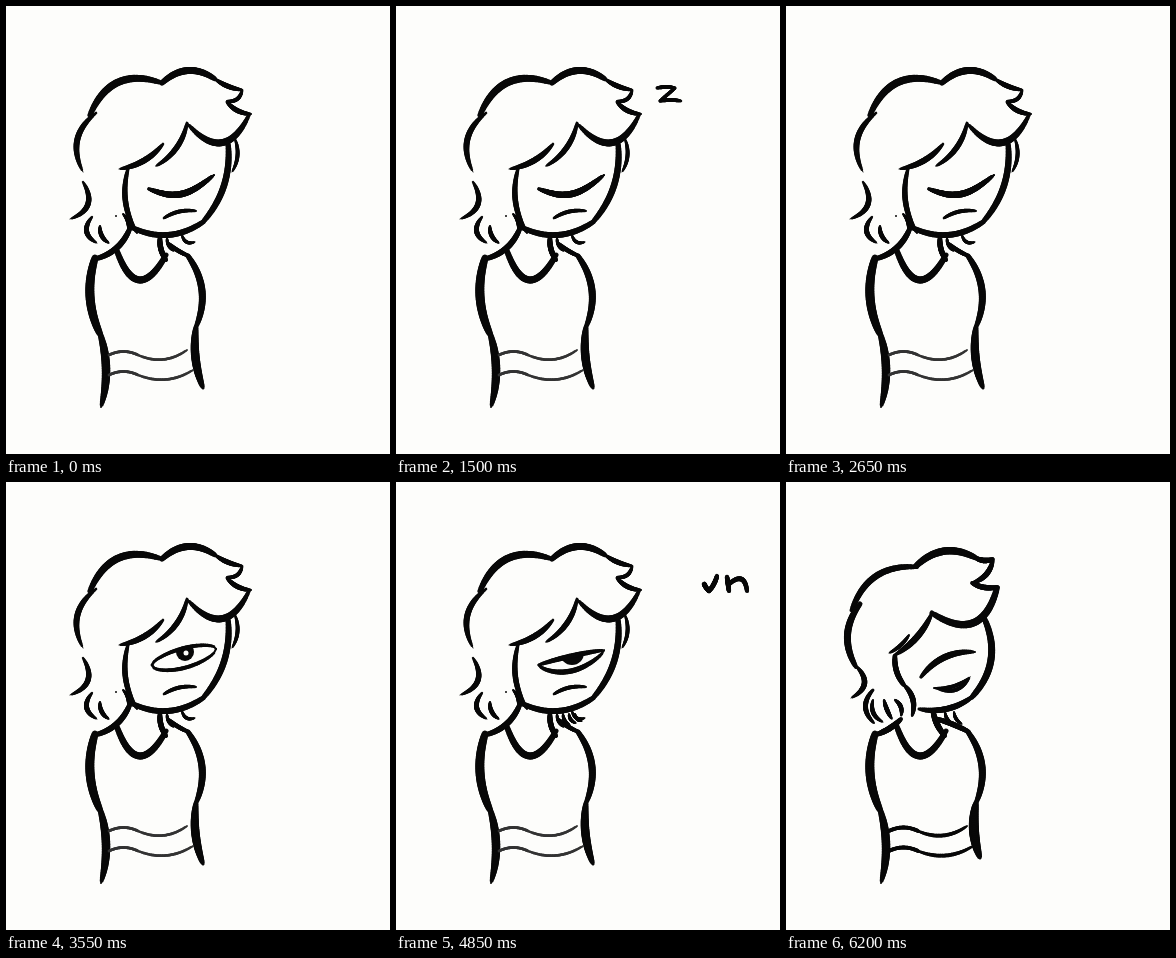
An HTML page with a canvas for the animation above (7.4 s loop, 384 by 448 pixels).

```html
<!DOCTYPE html>
<html lang="en">
<head>
<meta charset="utf-8">
<title>Sleepy cyclops</title>
<style>
html, body { margin: 0; width: 100%; height: 100%; overflow: hidden; background: #fdfdfb; }
canvas { display: block; }
</style>
</head>
<body>
<canvas id="stage" width="384" height="448"></canvas>
<script>
const ctx = document.getElementById('stage').getContext('2d');
const LOOP = 7400, PAPER = '#fdfdfb', INK = '#080808';

const clamp = v => Math.max(0, Math.min(1, v));
const ramp = (t, a, b) => clamp((t - a) / (b - a));
const mix = (a, b, k) => a.map((v, i) => v + (b[i] - v) * k);

// Brush along point(u), u = from..to, swelling from tip to width w
function brush(point, w, tip, from = 0, to = 1) {
  if (to <= from) return;
  const steps = 30;
  let last = point(from);
  for (let i = 1; i <= steps; i++) {
    const u = from + (to - from) * i / steps, next = point(u);
    ctx.lineWidth = tip + (w - tip) * Math.sqrt(Math.max(0, Math.sin(Math.PI * u)));
    ctx.beginPath();
    ctx.moveTo(...last);
    ctx.lineTo(...next);
    ctx.stroke();
    last = next;
  }
}

// Bowed stroke; sag is its depth to the left of the direction of travel
function bow(x1, y1, x2, y2, sag, w = 6, tip = 2, from = 0, to = 1) {
  const dx = x2 - x1, dy = y2 - y1, len = Math.hypot(dx, dy);
  brush(u => {
    const s = 4 * u * (1 - u) * sag / len;
    return [x1 + dx * u + dy * s, y1 + dy * u - dx * s];
  }, w, tip, from, to);
}

function disc(x, y, r) {
  ctx.beginPath();
  ctx.arc(x, y, r, 0, 7);
  ctx.fill();
}

function drawBody(bold) {
  bow(89, 252, 94, 328, -7.5, 9, 6);
  bow(93, 324, 95, 401, 6, 8.5, 2);
  bow(111, 245, 160, 249, -27, 7, 5);
  bow(182, 250, 190, 321, 10, 7, 4);
  bow(190, 321, bold ? 194 : 197, bold ? 376 : 382, -4, bold ? 10 : 8.5, 3);
  ctx.strokeStyle = bold ? INK : '#333';
  for (const y of [349, 369]) {
    const w = bold ? 3.8 : 2.8;
    bow(103, y, 132, y, 3.5, w, w);
    bow(132, y, y > 350 ? 187 : 181, y - 5, -7, w, 2);
  }
  ctx.strokeStyle = INK;
}

function drawHead(bushy) {
  // hair
  bow(84, 109, 156, 77, 18.5, 7.5, 4);
  bow(156, 77, 209, 73, 10.5, 7, 4.5);
  bow(209, 73, 237, 84, -2, 5, 1);
  bow(236, 85, 221, 95, 4, 4);
  bow(221, 96, 245, 108, -3, 5);
  bow(243, 109, 181, 117, 24, 7);
  bow(181, 117, 150, 160, 6, 5.5, 1.5);
  bow(157, 138, 113, 163, 5, 6, 1);
  bow(90, 107, 77, 166, -12.5, 6, 1);
  bow(77, 176, 64, 213, 12, 5.5, 1);
  bow(86, 211, 91, 237, -8, 5, 1);
  bow(94, 220, 103, 237, -3, 4.5, 1);
  bow(117, 208, 122, 223, 2, 3.5, 1);
  disc(110, 210, 1);
  // face
  bow(222, 137, 197, 216, 9, 6.5, 4.5);
  bow(197, 216, 125, 221, 10.5, 6, 4.5);
  bow(229, 133, 226, 166, 4, 4, 1);
  bow(122, 163, 131, 227, -7, 5.5);
  // neck
  bow(124, 222, 89, 253, 6, 6, 4);
  bow(154, 232, 160, 254, -2, 5.5, 4);
  bow(163, 238, 183, 250, -1, 4.5, 3);
  bow(176, 229, 189, 236, -4, 3.5, 1);
  for (let i = 0; i < (bushy ? 4 : 1); i++) bow(161 + 6 * i, 232, 168 + 6 * i, 245 - 2 * i, -2, 3.5, 1);
}

function drawTurnedHead() {
  // hair
  bow(66, 128, 131, 85, 15, 6.5, 4);
  bow(130, 84, 190, 76, 11, 7.5, 5);
  bow(190, 76, 207, 77, -2, 5.5, 3);
  bow(207, 77, 186, 101, 5, 5.5);
  bow(186, 101, 212, 105, -2.5, 5.5, 3);
  bow(211, 106, 146, 131, 24, 7.5, 5);
  bow(146, 131, 107, 174, 5, 6.5, 1);
  bow(123, 153, 103, 171, 2, 4, 1);
  bow(74, 122, 70, 185, -10.5, 7, 4);
  bow(70, 184, 65, 216, 11, 5.5, 1);
  bow(87, 208, 88, 241, -8, 5, 2);
  for (let i = 0; i < 3; i++) bow(87 + 11 * i, 218, 97 + 9 * i, 240 - 3 * i, 4 * i - 5, 4.5, 1);
  // face
  bow(109, 174, 118, 203, -3, 5.5, 4);
  bow(118, 203, 126, 234, 5, 5.5, 2);
  bow(199, 138, 186, 215, 12.5, 7, 5);
  bow(186, 215, 133, 227, 6, 6, 3);
  bow(135, 195, 189, 170, 8, 6.5);
  bow(148, 206, 184, 195, -4, 4, 1);
  bow(152, 207, 184, 195, -7, 4, 1);
  // neck
  bow(115, 237, 89, 253, 2, 6, 3);
  bow(147, 229, 159, 254, -2, 6, 4);
  bow(151, 237, 183, 250, 1, 5.5, 4);
  for (const x of [159, 168]) bow(x, 230, x + 8, 242, -2, 3.5, 1);
}

// Eye pose: left corner, right corner, upper and lower lid depth, roundness, pupil x y r, glint offset, line width
const SHUT = [143, 183, 208, 169, -12, 12, 1, 176, 171, 12, -9, 6.5];
const HALF = [143, 183, 208, 168, 10, 14, .5, 176, 171, 12, -9, 4.5];
const BORED = [146, 183, 210, 167, 9, 11, .5, 179, 170, 9, 1, 4];
const WIDE = [143, 186, 203, 176, 34, 13, .5, 176, 169, 11, -11, 5];
const LOOK = mix(HALF, BORED, .6);

const eyeKeys = [
  [0, SHUT], [1850, SHUT], [2150, HALF], [2300, LOOK], [2500, LOOK], [2650, SHUT],
  [2750, SHUT], [2800, LOOK], [3500, LOOK], [3550, BORED], [3600, BORED], [3900, SHUT],
  [4600, SHUT], [5000, HALF], [5200, HALF], [5500, WIDE], [6050, WIDE], [6150, SHUT], [LOOP, SHUT]
];

function eyeAt(t) {
  const i = eyeKeys.findIndex(k => k[0] > t), [a, p] = eyeKeys[i - 1], [b, q] = eyeKeys[i];
  return mix(p, q, ramp(t, a, b));
}

function drawEye([x1, y1, x2, y2, up, down, round, px, py, r, glint, w]) {
  const lid = depth => u => [
    x1 + (x2 - x1) * u,
    y1 + (y2 - y1) * u + depth * Math.max(0, Math.sin(Math.PI * u)) ** round
  ];
  const upper = lid(-up), lower = lid(down);
  ctx.save();
  ctx.beginPath();
  for (let i = 0; i <= 30; i++) ctx.lineTo(...upper(i / 30));
  for (let i = 30; i >= 0; i--) ctx.lineTo(...lower(i / 30));
  ctx.clip();
  disc(px, py, r);
  ctx.fillStyle = PAPER;
  disc(px + glint, py + 1, 2.5);
  ctx.restore();
  brush(upper, w, 2);
  brush(lower, w, 2);
}

function drawMouth(t) {
  const gape = t < 4400 ? 8 * ramp(t, 3650, 4000) - 4.5 * ramp(t, 4050, 4400) : 3.5 * (1 - ramp(t, 4600, 4800));
  if (gape > 0) {
    ctx.lineWidth = 3.8;
    ctx.beginPath();
    ctx.ellipse(177, 211, 10.5, gape, -.12, 0, 7);
    ctx.stroke();
  } else {
    bow(...mix([158, 212, 190, 205, 3], [148, 206, 190, 205, -8], ramp(t, 5200, 5500)), 4, 2);
  }
}

// Pen strokes of the handwritten word, in writing order
const yawn = [
  [250, 82, 261, 97, -3], [267, 82, 251, 111, 2],
  [286, 97, 272, 108, -5], [272, 108, 286, 98, -4], [286, 97, 289, 110, -1],
  [294, 95, 300, 109, -1], [300, 109, 307, 98, 0], [307, 98, 313, 109, -1], [313, 109, 321, 94, -1],
  [331, 95, 333, 109, 0], [333, 102, 351, 109, 9]
];

function drawYawn(t) {
  const on = ramp(t, 3650, 4250) * yawn.length, off = ramp(t, 4550, 5000) * yawn.length;
  yawn.forEach((s, i) => bow(...s, 4.8, 4.2, clamp(off - i), clamp(on - i)));
}

// A small z drifts up beside the head, twice
function drawZ(t) {
  const second = t >= 1000, step = (t - (second ? 1000 : 200)) / 100;
  if (step < 0 || step >= (second ? 8 : 7)) return;
  const size = .6 + .4 * clamp(step / 5);
  ctx.save();
  ctx.translate(273 + 5.5 * (step - 5), 88 - 3 * (step - 5));
  ctx.scale(size, size);
  bow(-12, -6, 6, -6, 1, 4, 2.5);
  bow(6, -6, -9, 7, 0, 3.5, 3);
  bow(-9, 7, 12, 7, 1, 4, 2.5);
  ctx.restore();
}

function draw(t) {
  ctx.fillStyle = PAPER;
  ctx.fillRect(0, 0, 384, 448);
  ctx.fillStyle = ctx.strokeStyle = INK;
  ctx.lineCap = 'round';
  const turned = t >= 6200;
  drawBody(turned);
  if (turned) return drawTurnedHead();
  ctx.save();
  if (t >= 6100) ctx.translate(t < 6150 ? -10 : -20, 3);
  drawHead(t >= 3900);
  drawEye(eyeAt(t));
  drawMouth(t);
  ctx.restore();
  drawZ(t);
  drawYawn(t);
}

const start = performance.now();
function tick() {
  const t = (performance.now() - start) % LOOP;
  const grid = t < 1800 || (t >= 5300 && t < 6000) ? 100 : 50;
  draw(Math.floor(t / grid) * grid);
  requestAnimationFrame(tick);
}
tick();
</script>
</body>
</html>
```
